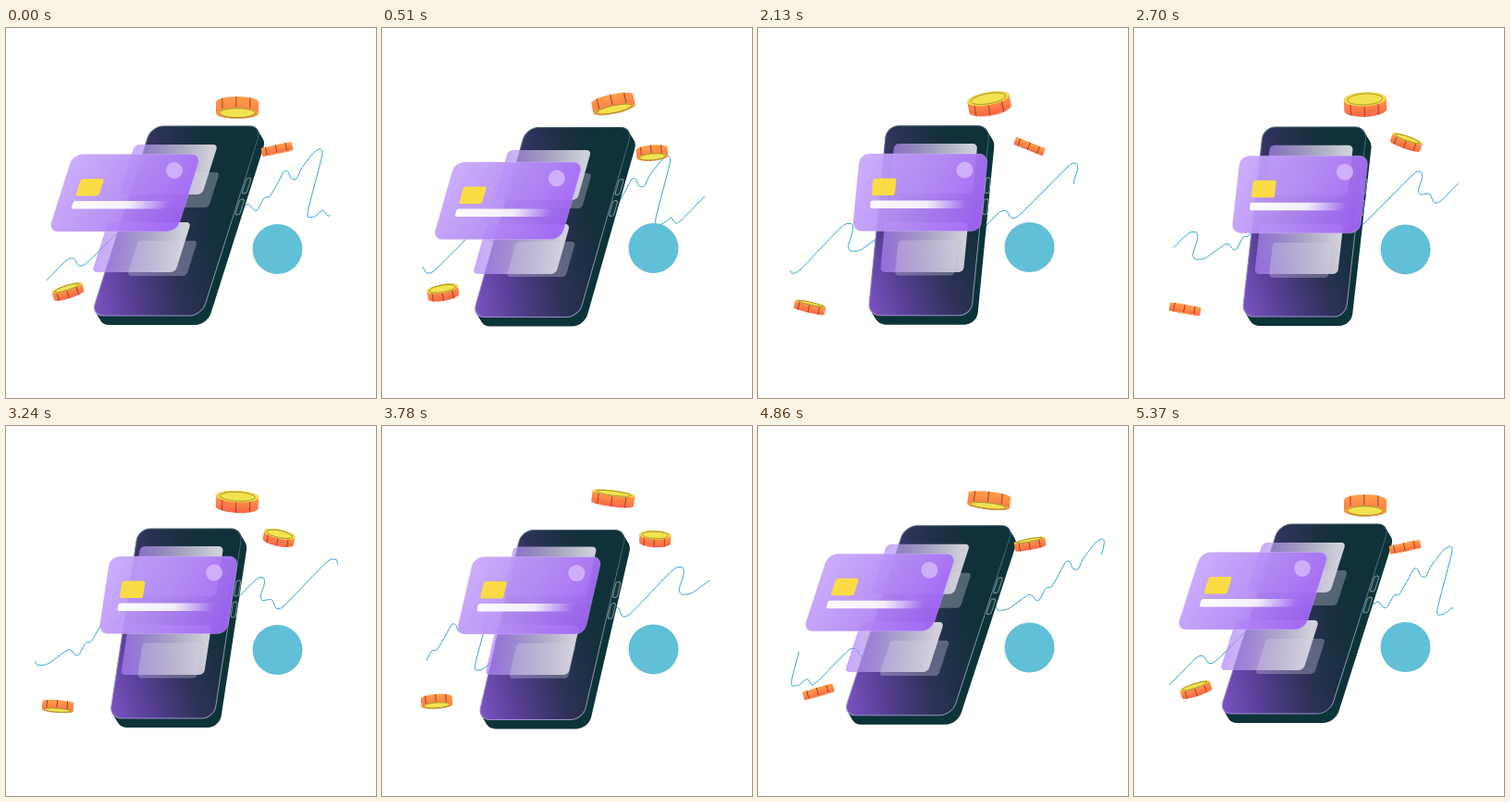
An HTML page with a canvas for the animation above (5400 ms loop, 400 by 400 pixels).

```html
<!DOCTYPE html>
<html lang="en">
<head>
<meta charset="utf-8">
<title>Mobile payments</title>
<style>
  html, body { margin: 0; width: 100%; height: 100%; overflow: hidden; background: #fff; }
  canvas { display: block; width: 400px; height: 400px; }
</style>
</head>
<body>
<canvas id="stage" width="400" height="400"></canvas>
<script>
const ctx = document.getElementById('stage').getContext('2d');
const LOOP = 5400;
const TIMES = [0, 510, 1200, 2130, 3240, 4350];

// Smooth periodic curve through key values; `gain` is added once per loop.
function track(values, times = TIMES, gain = 0) {
  const n = values.length;
  const key = j => {
    const turn = Math.floor(j / n), i = j - turn * n;
    return [times[i] + turn * LOOP, values[i] + turn * gain];
  };
  const slope = j => {
    const a = key(j - 1), b = key(j + 1);
    return (b[1] - a[1]) / (b[0] - a[0]);
  };
  return t => {
    let i = n - 1;
    while (times[i] > t) i--;
    const [t0, a] = key(i), [t1, b] = key(i + 1);
    const d = t1 - t0, u = (t - t0) / d, v = 1 - u;
    return a * v * v * (1 + 2 * u) + b * u * u * (3 - 2 * u)
      + d * u * v * (slope(i) * v - slope(i + 1) * u);
  };
}

const lean = track([.317, .285, .145, .098, .152, .31]);
const phoneX = track([157, 156, 142.5, 139, 143, 158.5]);
const phoneY = track([106, 107.5, 112.4, 107.5, 105.5, 108, 111, 112.8, 110],
  [0, 510, 1200, 1740, 2300, 2850, 3240, 3600, 4350]);
const phoneWidth = track([119.5, 115, 113, 111.5, 113, 115]);
const cardX = track([46, 55, 75, 102, 100, 57.5]);
const cardY = track([220, 228.5, 226.5, 219.5, 224.5, 224.5]);
const upperX = track([122, 121, 133, 142, 137, 123]);
const upperY = track([180, 186, 191, 179, 184, 184]);
const upperGlassX = track([155, 152, 152, 160, 158, 154]);
const upperGlassY = track([194, 195, 187, 183, 188, 198]);
const lowerX = track([93, 98, 121.5, 132, 124, 98]);
const lowerY = track([264, 266, 273, 264, 269, 268]);
const lowerGlassX = track([131, 134.5, 142, 148, 142, 132.5]);
const lowerGlassY = track([268, 269, 269, 267.5, 272.5, 272]);
const tokenY = track([239, 238, 242, 237, 242, 240]);
const lineEnd = track([.385, .453, .538, .7, .895, 1.115], TIMES, 1);

const coins = [
  { r: 23, h: 11.5, x: [250, 250, 250, 250, 250, 249.5], y: [86, 82, 76, 82, 82, 76],
    tilt: [0, -12, -22, -10, 3, 9], pitch: [-.27, -.21, 0, .3, .27, -.04] },
  { r: 17, h: 8.5, x: [293, 292, 292, 293.5, 295, 295], y: [131, 135, 135, 128, 121, 125],
    tilt: [-12, -5, 2, 22, 12, -7], pitch: [-.04, -.25, -.3, 0, .28, .22] },
  { r: 17, h: 8.5, x: [67, 66, 62, 56, 56, 63], y: [285, 286, 293, 302, 303, 291],
    tilt: [-18, -10, 1, 13, 4, -12], pitch: [.18, .28, .33, .1, -.15, -.2] }
];
for (const c of coins) for (const p of ['x', 'y', 'tilt', 'pitch']) c[p] = track(c[p]);

// One repeat of the chart line; each repeat is shifted by STEP.
const STEP = [322, -85], GAP = 14;
const wave = [
  [268, 197], [272, 197], [279, 183], [285, 183], [293, 169], [301, 154], [305, 155],
  [308, 163], [314, 164], [319, 152], [333, 134], [340, 130], [343, 134], [326, 198],
  [326, 205], [334, 204], [343, 196], [348, 204], [354, 200], [389, 164], [396, 164],
  [400, 172], [407, 172], [466, 112], [472, 113], [473, 119], [468, 133], [470, 138],
  [481, 136], [485, 147], [492, 146], [542, 93], [551, 93], [552, 100], [546, 118],
  [549, 123], [560, 122], [584, 104]
];
let chart = [-1, 0, 1].flatMap(n => wave.map(([x, y]) => [x + n * STEP[0], y + n * STEP[1]]));
const mix = (a, b, u) => a.map((v, i) => v + (b[i] - v) * u);
for (const cut of [.15, .25]) {
  chart = chart.slice(1).flatMap((p, i) => [mix(chart[i], p, cut), mix(chart[i], p, 1 - cut)]);
}
const waveLength = chart.slice(1).reduce(
  (sum, [x, y], i) => sum + Math.hypot(x - chart[i][0], y - chart[i][1]), 0) / 3;

function gradient(x0, y0, x1, y1, ...stops) {
  const g = ctx.createLinearGradient(x0, y0, x1, y1);
  stops.forEach(([at, color]) => g.addColorStop(at, color));
  return g;
}

function at(x, y, draw) {
  ctx.save();
  ctx.translate(x, y);
  draw();
  ctx.restore();
}

// Leaning local space with its origin at the lower left corner.
function leaning(x, y, k, draw) {
  at(x, y, () => {
    ctx.transform(1, 0, -k, 1, 0, 0);
    draw();
  });
}

function box(x, y, w, h, r, fill, stroke) {
  ctx.beginPath();
  ctx.roundRect(x, y, w, h, r);
  if (fill) { ctx.fillStyle = fill; ctx.fill(); }
  if (stroke) { ctx.strokeStyle = stroke; ctx.stroke(); }
}

function ellipse(y, rx, ry, fill, stroke) {
  ctx.beginPath();
  ctx.ellipse(0, y, rx, ry, 0, 0, 7);
  ctx.fillStyle = fill;
  ctx.fill();
  if (stroke) { ctx.strokeStyle = stroke; ctx.stroke(); }
}

function drawChart(t) {
  const u = t / LOOP;
  at(-STEP[0] * u, -STEP[1] * u, () => {
    ctx.setLineDash([waveLength - GAP, 9999]);
    ctx.lineDashOffset = -(lineEnd(t) * waveLength + GAP);
    ctx.strokeStyle = '#36a3da';
    ctx.beginPath();
    chart.forEach(([x, y]) => ctx.lineTo(x, y));
    ctx.stroke();
  });
}

function drawPhone(t, k) {
  const w = phoneWidth(t), h = 205;
  const x = phoneX(t) - k * h, y = phoneY(t) + h;
  for (let i = 10; i > 0; i--) {
    leaning(x + i * .6, y + i, k, () => box(0, -h, w, h, 13, '#0d3438'));
  }
  leaning(x, y, k, () => {
    const face = gradient(0, 0, 130, -60,
      [0, '#7d55c6'], [.3, '#553f93'], [.62, '#2e3259'], [.88, '#18303f'], [1, '#10313a']);
    const edge = gradient(0, 0, w, -h,
      [0, '#a58bdc'], [.5, '#8f99ac'], [1, '#39585f']);
    box(0, -h, w, h, 13, face, edge);
    for (const top of [56, 79]) box(w + 1.5, top - h, 5, 17, 2.5, '#16393e', '#78959a');
  });
}

function drawPanel(x, y, k) {
  leaning(x, y, k, () => box(0, -54, 90, 54, 5, gradient(0, 0, 90, -20,
    [0, 'rgba(172,124,250,.68)'], [.3, 'rgba(184,160,234,.72)'],
    [.65, 'rgba(205,198,226,.8)'], [1, 'rgba(232,230,238,.88)'])));
}

function drawGlass(x, y, k) {
  leaning(x, y, k, () => box(0, -38, 64, 38, 4, 'rgba(215,212,230,.32)'));
}

function drawCard(t, k) {
  leaning(cardX(t), cardY(t), k, () => {
    box(0, -83.5, 138.5, 83.5, 10, gradient(0, -65, 135, -15,
      [0, 'rgba(198,166,251,.93)'], [.5, 'rgba(180,138,245,.93)'],
      [1, 'rgba(161,101,247,.94)']), 'rgba(215,190,255,.35)');
    box(17, -57, 25, 18.5, 2.5, '#f9dc45');
    box(16.5, -33, 104, 8.5, 2, gradient(16, 0, 120, 0,
      [0, 'rgba(255,255,255,.97)'], [.6, 'rgba(255,255,255,.85)'], [1, 'rgba(255,255,255,0)']));
  });
  // Plain disc as the card's emblem.
  at(cardX(t) + 115 + k * 66, cardY(t) - 66, () => ellipse(0, 9, 9, '#cfaefb'));
}

function drawCoin(c, t) {
  const { r, h } = c, p = c.pitch(t), ry = r * Math.abs(p), d = h / 2;
  at(c.x(t), c.y(t), () => {
    ctx.rotate(c.tilt(t) * Math.PI / 180);
    const side = gradient(0, -d - ry, 0, d + ry, [0, '#ff9f4b'], [.5, '#ff8747'], [1, '#fb6447']);
    ellipse(-d, r, ry, side);
    ellipse(d, r, ry, side);
    box(-r, -d, 2 * r, h, 1, side);
    ctx.strokeStyle = '#91472f';
    ctx.beginPath();
    for (const f of [-.7, -.05, .6]) {
      const bend = p * r * Math.sqrt(1 - f * f);
      ctx.moveTo(f * r, bend - d);
      ctx.lineTo(f * r, bend + d);
    }
    ctx.stroke();
    const faceY = -Math.sign(p) * d;
    ellipse(faceY, r, ry, p > 0 ? '#f2dc48' : '#f39a40');
    ctx.lineWidth = .8;
    if (ry > 1.5) ellipse(faceY, r * .83, ry * .8, '#f3e250', '#99882d');
  });
}

function draw(t) {
  const k = lean(t);
  ctx.fillStyle = '#fff';
  ctx.fillRect(0, 0, 400, 400);
  ctx.lineWidth = 1;
  drawChart(t);
  drawPhone(t, k);
  drawPanel(upperX(t), upperY(t), k);
  drawGlass(upperGlassX(t), upperGlassY(t), k);
  drawPanel(lowerX(t), lowerY(t), k);
  drawGlass(lowerGlassX(t), lowerGlassY(t), k);
  drawCard(t, k);
  at(293.5, tokenY(t), () => ellipse(0, 27, 27, '#62bfd8'));
  coins.forEach(c => drawCoin(c, t));
}

const start = performance.now();
function frame() {
  const t = (performance.now() - start) % LOOP;
  draw(Math.floor(t / 30) * 30);
  requestAnimationFrame(frame);
}
frame();
</script>
</body>
</html>
```
